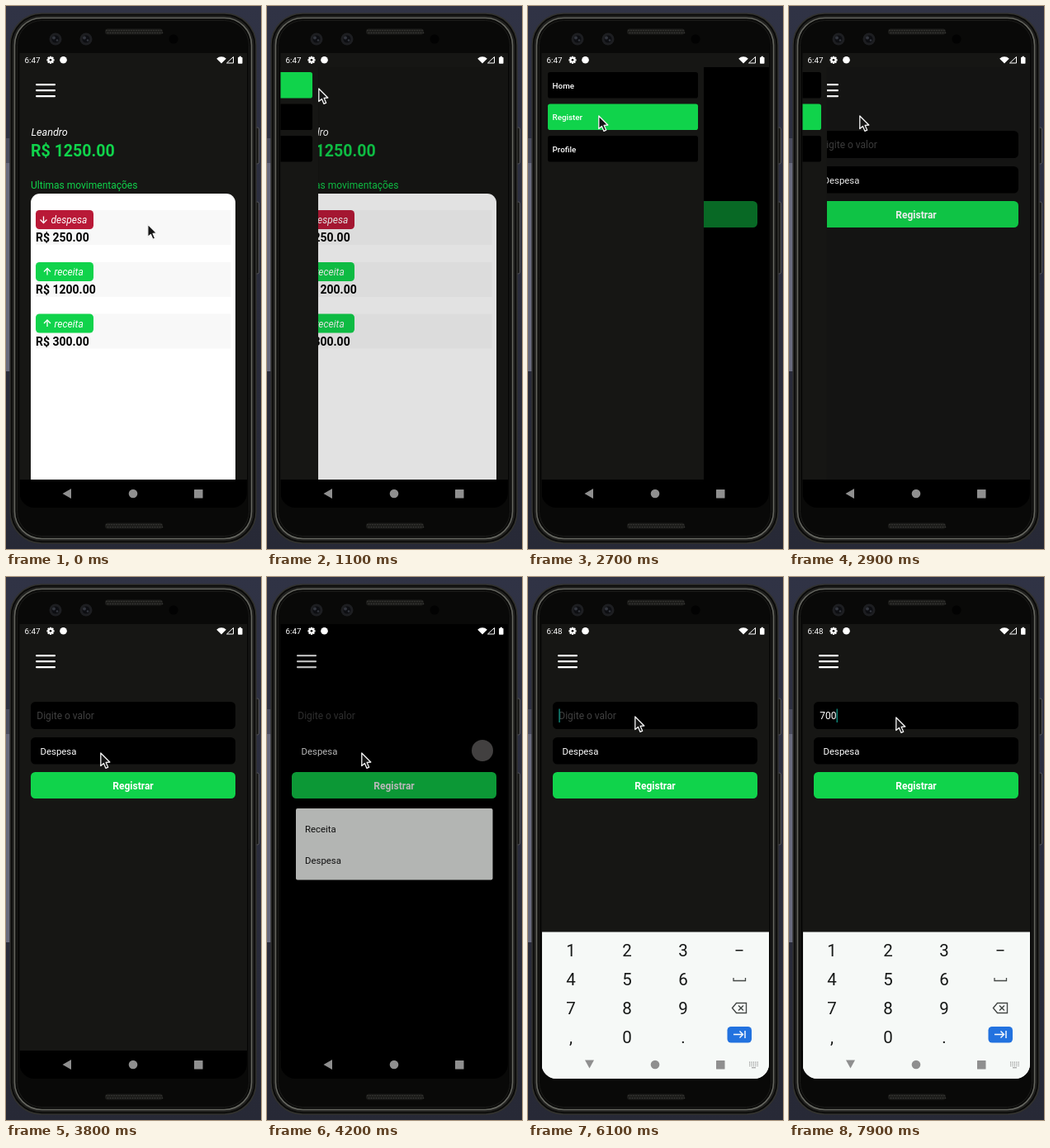
Animation, 309 px wide and 657 px high, one loop 8 s. Source, as an HTML page with a canvas:

```html
<!DOCTYPE html>
<html lang="pt">
<head>
<meta charset="utf-8">
<title>Movimentações</title>
<style>
html, body { margin: 0; width: 100%; height: 100%; overflow: hidden; background: #2b2d3b; }
canvas { display: block; width: 309px; height: 657px; }
</style>
</head>
<body>
<canvas id="stage" width="309" height="657"></canvas>
<script>
const LOOP = 8000, STEP = 100;
const GREEN = '#10d34b', RED = '#b91937', APP = '#161614', GRAY = '#8f8f8f';
const ctx = document.getElementById('stage').getContext('2d');

const clamp = v => Math.max(0, Math.min(1, v));
const mix = (a, b, u) => a + (b - a) * u;

// Pointer path: time, x, y
const POINTER = [
  [0, 171, 263], [200, 140, 215], [500, 40, 92], [700, 62, 99], [1400, 62, 99],
  [1900, 85, 132], [2900, 85, 132], [3000, 149, 154], [3100, 149, 154],
  [3800, 114, 212], [5100, 114, 212], [5700, 129, 168], [6400, 129, 168], [6500, 129, 169]
];

function pointerAt(t) {
  const i = POINTER.findIndex(p => p[0] > t);
  if (i < 0) return POINTER[POINTER.length - 1].slice(1);
  const [t0, x0, y0] = POINTER[i - 1], [t1, x1, y1] = POINTER[i];
  const u = (t - t0) / (t1 - t0);
  return [mix(x0, x1, u), mix(y0, y1, u)];
}

function box(x, y, w, h, r, fill, stroke, width = 1) {
  ctx.beginPath();
  ctx.roundRect(x, y, w, h, r);
  if (fill) { ctx.fillStyle = fill; ctx.fill(); }
  if (stroke) { ctx.strokeStyle = stroke; ctx.lineWidth = width; ctx.stroke(); }
}

function disc(x, y, r, fill) {
  ctx.beginPath();
  ctx.arc(x, y, r, 0, 7);
  ctx.fillStyle = fill;
  ctx.fill();
}

function trace(points, close) {
  ctx.beginPath();
  points.forEach(([x, y]) => ctx.lineTo(x, y));
  if (close) ctx.closePath();
}

function shape(points, fill) {
  trace(points, true);
  ctx.fillStyle = fill;
  ctx.fill();
}

function line(points, color, width = 1, close = false) {
  trace(points, close);
  ctx.strokeStyle = color;
  ctx.lineWidth = width;
  ctx.stroke();
}

function text(s, x, y, size, color, style = '', align = 'left') {
  ctx.font = `${style} ${size}px Roboto, sans-serif`;
  ctx.textAlign = align;
  ctx.fillStyle = color;
  ctx.fillText(s, x, y);
}

function clipped(x, y, w, h, r, draw) {
  ctx.save();
  ctx.beginPath();
  ctx.roundRect(x, y, w, h, r);
  ctx.clip();
  draw();
  ctx.restore();
}

function grille(y) {
  box(120, y - 3.5, 70, 7, 3.5, '#1d1d1b');
  for (let x = 122; x < 189; x += 3) {
    disc(x, y - 1.5, 0.8, '#3a3a37');
    disc(x + 1.5, y + 1.5, 0.8, '#3a3a37');
  }
}

function drawPhone() {
  const g = ctx.createLinearGradient(0, 0, 0, 657);
  g.addColorStop(0, '#303345');
  g.addColorStop(0.5, '#2b2d3c');
  g.addColorStop(1, '#272936');
  ctx.fillStyle = g;
  ctx.fillRect(0, 0, 309, 657);
  ctx.fillStyle = '#4a4c5e';
  ctx.fillRect(0, 160, 5, 30);
  ctx.fillStyle = '#686a7d';
  ctx.fillRect(0, 190, 5, 252);
  box(302, 147, 4.5, 44, 2, '#1c1c1b', '#55565a');
  box(302, 237, 4.5, 87, 2, '#1c1c1b', '#55565a');
  box(5, 9, 298, 641, 38, '#0a0a09', '#32322f', 1.5);
  box(7.5, 11.5, 293, 636, 36, '#20201e');
  box(10.5, 14.5, 287, 630, 33, '#090908', '#64655f', 1.6);
  box(13.5, 17.5, 281, 624, 30, '#090908', '#1c1c1a');
  grille(31);
  grille(629);
  for (const x of [60, 97]) {
    disc(x, 40, 7.5, '#1d1e21');
    disc(x, 40, 4.5, '#0d0e12');
    disc(x - 2, 38.5, 2, '#33363e');
    disc(x + 2, 41.5, 1.3, '#33363e');
  }
  disc(203, 40, 5.5, '#020202');
}

function drawStatus(t) {
  text(t < 6000 ? '6:47' : '6:48', 22.5, 69, 9.8, '#fff');
  ctx.save();
  ctx.translate(54, 65.3);
  for (let i = 0; i < 4; i++) {
    ctx.rotate(Math.PI / 4);
    box(-1.1, -4.6, 2.2, 9.2, 0.5, '#fff');
  }
  disc(0, 0, 3.4, '#fff');
  disc(0, 0, 1.4, APP);
  ctx.restore();
  disc(69.5, 65.3, 4.3, '#fff');
  ctx.beginPath();
  ctx.moveTo(261, 69.5);
  ctx.arc(261, 69.5, 8.2, -Math.PI * 0.75, -Math.PI * 0.25);
  ctx.closePath();
  ctx.fillStyle = '#fff';
  ctx.fill();
  line([[267.5, 69], [275.5, 69], [275.5, 61.5]], '#fff', 1, true);
  box(281, 62, 5.5, 7.8, 0.8, '#fff');
  ctx.fillRect(282.5, 60.8, 2.5, 1.5);
}

function drawMenuIcon() {
  for (const y of [94, 101, 108]) box(36, y, 24, 2.2, 1, '#fff');
}

function drawEntry(y, kind, amount) {
  const income = kind === 'receita', x = income ? 50 : 45.5, dir = income ? -1 : 1;
  ctx.fillStyle = '#f8f8f8';
  ctx.fillRect(36, y, 236.5, 42);
  box(36, y, 70, 23, 4.5, income ? GREEN : RED);
  const cy = y + 11.5;
  line([[x, cy - 4 * dir], [x, cy + 4 * dir]], '#fff', 1.3);
  line([[x - 4, cy], [x, cy + 4 * dir], [x + 4, cy]], '#fff', 1.3);
  text(kind, income ? 58.5 : 54.5, y + 16, 12, '#fff', 'italic');
  text('R$ ' + amount, 36, y + 38, 14, '#000', 'bold');
}

function drawHome() {
  text('Leandro', 30.5, 157, 12.6, '#fff', 'italic');
  text('R$ 1250.00', 30, 182, 19.6, GREEN, 'bold');
  text('Ultimas movimentações', 30, 221, 12, GREEN);
  box(30, 227, 248, 360, 11, '#fff');
  drawEntry(247, 'despesa', '250.00');
  drawEntry(310, 'receita', '1200.00');
  drawEntry(372.5, 'receita', '300.00');
}

function drawForm(t) {
  box(30, 151, 248, 33, 5.5, '#000');
  box(30, 194, 248, 32.5, 5.5, '#000');
  box(30, 236, 248, 32, 5.5, GREEN);
  const typed = '700'.slice(0, t < 7500 ? 0 : t < 7700 ? 1 : t < 7900 ? 2 : 3);
  text(typed || 'Digite o valor', 37.3, 172, 12, typed ? '#fff' : '#404040');
  const caretOn = t >= 5900 && (t < 6400 || t >= 6900);
  if (caretOn) {
    const x = 37.3 + (typed ? ctx.measureText(typed).width : 0);
    ctx.fillStyle = '#0f8275';
    ctx.fillRect(x, 159.5, 1.5, 16.5);
  }
  text('Despesa', 41.5, 215, 11.4, '#fff');
  text('Registrar', 154, 256.5, 12, '#fff', 'bold', 'center');
}

function drawDrawer(open, current) {
  const left = 17 - 196 * (1 - open);
  ctx.fillStyle = APP;
  ctx.fillRect(left, 74, 196, 499);
  ['Home', 'Register', 'Profile'].forEach((label, i) => {
    const y = 80 + i * 38.5;
    box(left + 7, y, 182, 31.5, 2.8, label === current ? GREEN : '#000');
    text(label, left + 12.6, y + 19.8, 9.8, '#fff', '500');
  });
}

function dim(alpha, y) {
  ctx.fillStyle = `rgba(0,0,0,${alpha})`;
  ctx.fillRect(17, y, 275, 573 - y);
}

function drawPicker(shown) {
  if (shown < 1) disc(261, 210, 13, `rgba(66,64,64,${shown < 0.8 ? 1 : 0.5})`);
  ctx.globalAlpha = shown;
  box(35, 280, 238.5, 86.5, 2, '#fdfffc');
  ctx.globalAlpha = 1;
  text('Receita', 46, 309, 11.4, '#111');
  text('Despesa', 46, 346.5, 11.4, '#111');
}

function drawNav(keyboard) {
  if (!keyboard) {
    ctx.fillStyle = '#000';
    ctx.fillRect(17, 573, 275, 34);
  }
  shape(keyboard ? [[69, 584.5], [80, 584.5], [74.5, 594.5]]
                 : [[79, 584], [79, 596], [68.5, 590]], GRAY);
  disc(154, 590, 5.3, GRAY);
  box(228, 585, 10.5, 10.5, 0.5, GRAY);
  if (keyboard) {
    for (let i = 0; i < 15; i++) box(268 + i % 5 * 2.4, 586.5 + Math.floor(i / 5) * 2.2, 1.2, 1.2, 0, GRAY);
    box(271, 593.3, 5, 1, 0, GRAY);
  }
}

function drawKeyboard(shift) {
  ctx.save();
  ctx.translate(0, shift);
  ctx.fillStyle = '#f6f9f7';
  ctx.fillRect(17, 429.5, 275, 178);
  const ink = '#161817', icon = '#444846';
  ['123', '456', '789', ',0.'].forEach((row, r) => [...row].forEach((key, c) =>
    text(key, 52 + c * 68, 459 + r * 35, 20.5, ink, '', 'center')));
  box(251.5, 451, 9, 1.6, 0, ink);
  line([[249, 485], [249, 488.5], [263.5, 488.5], [263.5, 485]], icon, 1.3);
  line([[247.5, 521.5], [252.5, 515.5], [264.5, 515.5], [264.5, 527.5], [252.5, 527.5]], icon, 1.4, true);
  line([[255, 518.5], [261, 524.5]], icon, 1.4);
  line([[261, 518.5], [255, 524.5]], icon, 1.4);
  box(241.5, 544, 29.5, 19.5, 4.5, '#2272df');
  line([[249, 553.5], [260, 553.5]], '#fff', 1.4);
  line([[256.5, 549.5], [260.5, 553.5], [256.5, 557.5]], '#fff', 1.4);
  line([[263, 549], [263, 558]], '#fff', 1.4);
  ctx.restore();
}

function drawPointer([x, y]) {
  ctx.save();
  ctx.translate(x + 0.8, y + 1);
  ctx.lineJoin = 'round';
  const arrow = [[0, 0], [0, 15.5], [3.6, 12.4], [6.2, 18.4], [8.9, 17.2], [6.3, 11.3], [11, 11]];
  shape(arrow, '#151515');
  line(arrow, '#f4f4f4', 1.3, true);
  ctx.restore();
}

function drawerOpen(t) {
  if (t < 1100 || t >= 3000) return 0;
  return t < 2000 ? 1 - (1 - clamp((t - 1050) / 600)) ** 3
                  : (1 - clamp((t - 2740) / 260)) ** 2;
}

function render(t) {
  const open = drawerOpen(t);
  const picking = t >= 4200 && t < 4900;
  const pickerShown = picking ? Math.min(1, 0.71 + (t - 4200) / 500) : 0;
  const pickerDim = picking ? Math.min(0.6, 0.28 + (t - 4200) / 600) : 0;
  const onForm = t >= 2700;

  drawPhone();
  clipped(16.5, 57, 275.5, 550, [0, 0, 18, 18], () => {
    ctx.fillStyle = picking ? '#000' : APP;
    ctx.fillRect(16, 57, 276, 516);
    if (open > 0.3) {
      ctx.fillStyle = '#000';
      ctx.fillRect(17, 74, 275, 499);
    }
    drawMenuIcon();
    if (onForm) drawForm(t); else drawHome();
    if (open) {
      dim(open * 0.5, 74);
      drawDrawer(open, onForm ? 'Register' : 'Home');
    }
    if (picking) {
      dim(pickerDim, 57);
      drawPicker(pickerShown);
    }
    drawStatus(t);
    const keyboard = t >= 6000;
    if (keyboard) {
      ctx.fillStyle = '#f6f9f7';
      ctx.fillRect(17, 573, 275, 34);
      drawKeyboard(t < 6100 ? 60 : 0);
    }
    drawNav(keyboard);
  });
  drawPointer(pointerAt(t));
}

function frame(now) {
  render(Math.floor(now % LOOP / STEP) * STEP);
  requestAnimationFrame(frame);
}
frame(0);
</script>
</body>
</html>
```
